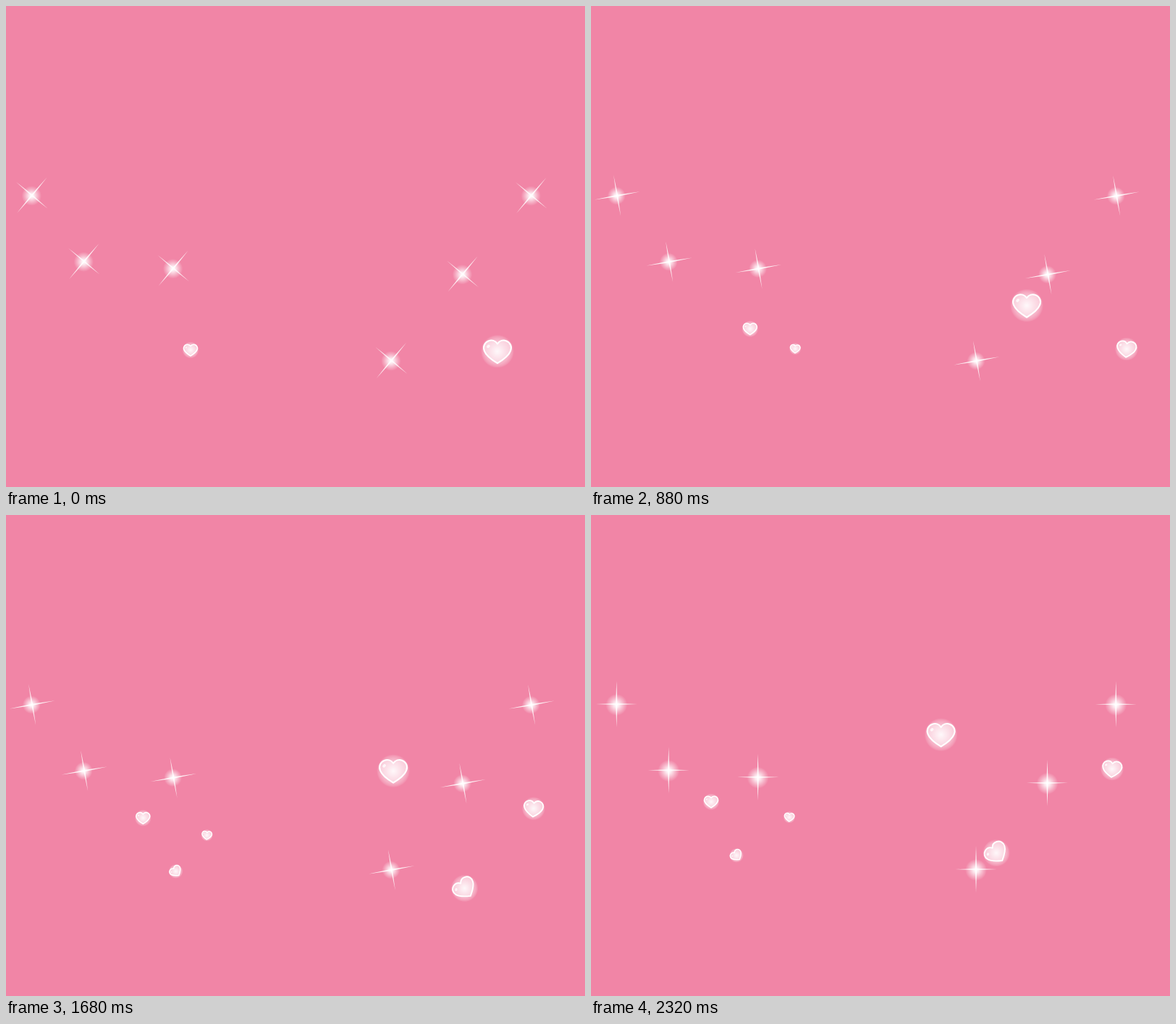
An HTML page for the animation above (2.4 s loop, 800 by 664 pixels).

```html
<!DOCTYPE html>
<html lang="en">
<head>
<meta charset="utf-8">
<title>Drifting hearts</title>
<style>
  html, body { margin: 0; width: 100%; height: 100%; overflow: hidden; background: #f185a6; }
  svg { display: block; width: 100%; height: 100%; }
</style>
</head>
<body>
<svg id="stage" viewBox="0 0 800 664">
  <defs>
    <radialGradient id="starGlow">
      <stop offset="0" stop-color="#fff"/>
      <stop offset=".25" stop-color="#fff" stop-opacity=".82"/>
      <stop offset=".65" stop-color="#fff" stop-opacity=".36"/>
      <stop offset="1" stop-color="#fff" stop-opacity="0"/>
    </radialGradient>
    <radialGradient id="halo">
      <stop offset="0" stop-color="#fff" stop-opacity=".9"/>
      <stop offset=".4" stop-color="#fff" stop-opacity=".6"/>
      <stop offset=".75" stop-color="#fff" stop-opacity=".35"/>
      <stop offset=".9" stop-color="#fff" stop-opacity=".18"/>
      <stop offset="1" stop-color="#fff" stop-opacity="0"/>
    </radialGradient>
  </defs>
</svg>
<script>
const STEP = 80, STEPS = 30, STAR_STEPS = 10;
const HEART = "M0-10.5C-3-15-8-16-12-14.6C-18-12.5-20.5-6-18-.5C-15.5 6-8 11.5 0 16.3" +
              "C8 11.5 15.5 6 18-.5C20.5-6 18-12.5 12-14.6C8-16 3-15 0-10.5Z";
const stage = document.getElementById("stage");

function add(parent, tag, attrs) {
  const el = document.createElementNS("http://www.w3.org/2000/svg", tag);
  for (const name in attrs) el.setAttribute(name, attrs[name]);
  return parent.appendChild(el);
}

const spike = (w, l) => `M0 ${-l}L${w} 0L0 ${l}L${-w} 0Z`;

const stars = [[35.3, 262], [107.3, 353.2], [230.6, 362.7], [630.5, 370.7], [532, 490], [725.3, 262.2]]
  .map(([x, y]) => {
    const g = add(stage, "g", { transform: `translate(${x} ${y})` });
    const glow = add(g, "circle", { fill: "url(#starGlow)" });
    const rays = add(g, "g", { fill: "#fff" });
    // The cross sits slightly off its pivot
    add(rays, "path", { d: spike(1.15, 32), transform: "translate(0 -.9)", opacity: .85 });
    add(rays, "path", { d: spike(1.1, 28.5), transform: "translate(0 -.9) rotate(90)", opacity: .78 });
    return { glow, rays };
  });

// x and y: start, speed and acceleration per step
const hearts = [
  { from: 0, size: 1, tilt: 0, x: [679, -7.15, .0142], y: [476.8, -5.62, -.0125] },
  { from: 0, size: .5, tilt: 0, x: [255, -3.28, .0073], y: [474.9, -2.62, -.0036] },
  { from: 9, size: .36, tilt: 4, x: [283, -.45, 0], y: [479.4, -3.11, 0] },
  { from: 9, size: .7, tilt: 5, x: [742.2, -1.11, 0], y: [487.2, -6.83, 0] },
  { from: 19, size: .43, tilt: -38, x: [243, -4.2, 0], y: [497.4, -2.75, 0] },
  { from: 19, size: .82, tilt: -38, x: [652, -9.2, 0], y: [527.5, -6.1, 0] }
];

for (const h of hearts) {
  h.el = add(stage, "g", {});
  add(h.el, "circle", { r: 23, fill: "url(#halo)" });
  add(h.el, "path", {
    d: HEART, fill: "#fff", "fill-opacity": .42, stroke: "#fff",
    "stroke-width": (1 + 1.1 * h.size) / h.size, "stroke-linejoin": "round"
  });
  add(h.el, "ellipse", { cx: -12.5, cy: -7, rx: 2.6, ry: 2, fill: "#fff", opacity: .75, transform: "rotate(-40 -12.5 -7)" });
}

const along = ([start, speed, accel], n) => start + speed * n + accel * n * n;

// Glow shrinks until phase 5, then grows back by phase 9
const glowRadius = phase => 8.6 + 6.4 * (phase < 5 ? (5 - phase) / 5 : (phase - 5) / 4);

function draw(time) {
  const step = Math.floor(time / STEP) % STEPS;

  const phase = (step + 1) % STAR_STEPS;
  for (const { glow, rays } of stars) {
    glow.setAttribute("r", glowRadius(phase));
    rays.setAttribute("transform", `rotate(${40 * phase})`);
  }

  for (const h of hearts) {
    const n = step - h.from;
    h.el.setAttribute("visibility", n < 0 ? "hidden" : "visible");
    h.el.setAttribute("transform",
      `translate(${along(h.x, n)} ${along(h.y, n)}) rotate(${h.tilt}) scale(${h.size})`);
  }
}

const begin = performance.now();
function loop() {
  draw(performance.now() - begin);
  requestAnimationFrame(loop);
}
loop();
</script>
</body>
</html>
```
